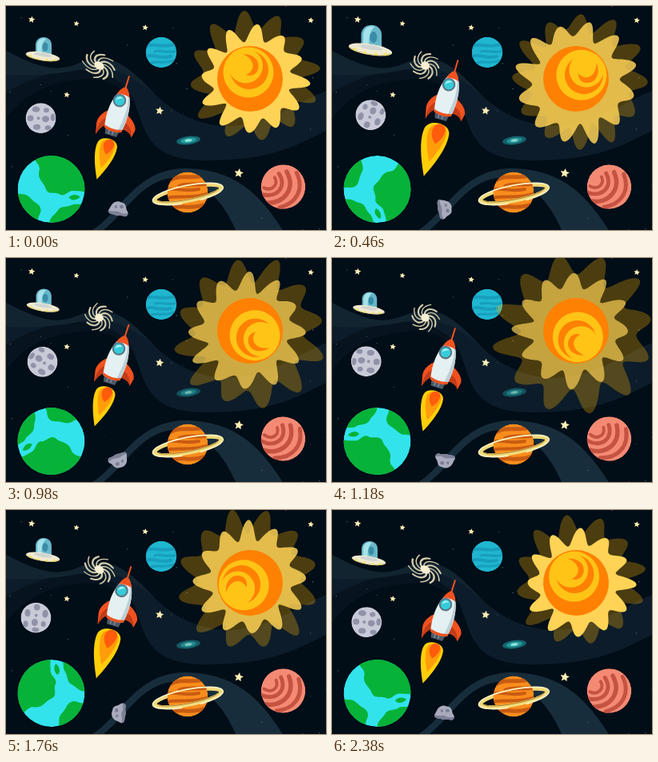
Animation, 400 px wide and 280 px high, one loop 2.4 s. Source, as an HTML page:

```html
<!DOCTYPE html>
<html lang="en">
<head>
<meta charset="utf-8">
<title>Space</title>
<style>
html, body { margin: 0; width: 100%; height: 100%; overflow: hidden; background: #010d17; }
svg { display: block; width: 100vw; height: 100vh; }
</style>
</head>
<body>
<svg viewBox="0 0 400 280">
  <defs>
    <clipPath id="earthClip"><circle r="42"/></clipPath>
    <clipPath id="blueClip"><circle r="19.3"/></clipPath>
    <clipPath id="redClip"><circle r="27.8"/></clipPath>
    <clipPath id="saturnClip"><circle r="25.5"/></clipPath>
    <clipPath id="moonClip"><circle r="19"/></clipPath>
    <path id="star" fill="#ffeeb4"/>
  </defs>
  <rect width="400" height="280" fill="#010d17"/>
  <path fill="#0c1c2a" d="M0 56C35 74 60 85 90 72C130 55 152 74 186 110C216 140 250 150 280 150C330 148 365 120 400 106V156C360 176 330 193 250 193C190 193 177 170 166 135C155 100 130 82 92 87C50 92 25 108 0 140Z"/>
  <path fill="#07141f" d="M0 108C30 92 60 78 95 80C135 83 155 100 164 126C150 102 125 88 92 92C50 96 22 112 0 140Z"/>
  <path fill="#122430" d="M0 56C35 74 60 85 90 72C130 55 152 74 186 110C160 88 130 72 95 79C60 86 30 88 0 86Z"/>
  <path fill="#182d3b" d="M108 280C140 262 160 205 222 203C290 203 320 240 346 280H287C270 240 242 214 207 215C168 220 152 256 122 280Z"/>
  <g id="dots" fill="#5b6d70"></g>
  <g id="stars"></g>

  <!-- blue planet -->
  <g transform="translate(194 58)" clip-path="url(#blueClip)">
    <circle r="19.3" fill="#20b6d0"/>
    <g fill="none" stroke="#179fbd" stroke-linecap="round">
      <path stroke-width="4" d="M-19-8C-8-12 0-5 18-10"/>
      <path stroke-width="3" d="M-8-1C0-4 8 2 20-2"/>
      <path stroke-width="4" d="M-20 5C-9 1 -2 9 12 5"/>
      <path stroke-width="3" d="M-12 13C-4 10 6 15 15 10"/>
    </g>
  </g>

  <!-- spindle galaxy -->
  <g id="spindle" transform="translate(228 168) rotate(-8)">
    <ellipse rx="15" ry="5.2" fill="#15656f"/>
    <ellipse rx="10" ry="3.2" fill="#279da0"/>
    <ellipse rx="4.5" ry="1.7" fill="#8fe6d8"/>
  </g>

  <!-- ringed planet -->
  <g transform="translate(227 233)">
    <g transform="rotate(-11)" fill="none"><ellipse cy="2" rx="42" ry="8.5" stroke="#f0d878" stroke-width="4.5"/></g>
    <g clip-path="url(#saturnClip)">
      <circle r="25.5" fill="#f98d1c"/>
      <g fill="none" stroke="#c95c12" stroke-linecap="round">
        <path stroke-width="5" d="M-22-15C-8-24 4-15 24-22"/>
        <path stroke-width="5" d="M-10-8C4-13 12-7 28-12"/>
        <path stroke-width="4" d="M-27-3C-16-7-8 0 14-4"/>
        <path stroke-width="4" d="M-26 7C-12 3 4 9 27 1"/>
        <path stroke-width="5" d="M-18 19C-8 15 4 22 22 15"/>
      </g>
    </g>
    <g transform="rotate(-11) translate(0 2)" fill="none">
      <path stroke="#f3dc7c" stroke-width="4.5" d="M-42 0A42 8.5 0 0 0 42 0"/>
      <ellipse rx="44.8" ry="10.8" stroke="#fff4c4" stroke-width="1.6" stroke-dasharray="34 23 200"/>
      <path stroke="#a87a2a" stroke-width=".9" d="M-39 0A39 7 0 0 0 39 0"/>
    </g>
  </g>

  <!-- red planet -->
  <g id="red">
    <g clip-path="url(#redClip)">
      <circle r="27.8" fill="#f58a74"/>
      <g fill="none" stroke="#c55341" stroke-linecap="round">
        <path stroke-width="4" d="M-24-2C-14 4-5-4-9-13"/>
        <path stroke-width="5" d="M-27 6C-9 13 5 0-3-17"/>
        <path stroke-width="5.5" d="M-22 17C-4 21 16 6 7-18"/>
        <path stroke-width="5" d="M-8 25C14 23 26 6 19-15"/>
      </g>
    </g>
  </g>

  <!-- earth -->
  <g id="earth">
    <g clip-path="url(#earthClip)">
      <circle r="42" fill="#32e3ec"/>
      <g fill="#07b238">
        <path d="M-24-46C-22-33-13-32-15-23C-18-12-9-9-7-1C-4 8 4 3 10 6C17 11 21 1 28 2C34 3 38 1 46 6L50-50H-24Z"/>
        <path d="M-46 4C-37 8-32 4-26 11C-20 18-14 18-13 25C-12 31-18 34-16 42H-46Z"/>
        <path d="M-2 46C-3 35 4 33 8 27C12 20 20 23 25 20C30 17 34 20 40 18V46Z"/>
        <path d="M22 10C27 5 35 7 36 10C31 14 25 15 22 10Z"/>
      </g>
    </g>
  </g>

  <!-- moon -->
  <g id="moon">
    <g transform="translate(.5 5.5)" clip-path="url(#moonClip)">
      <circle r="19" fill="#c8cad8"/>
      <g fill="#9093a8">
        <ellipse cx="-6" cy="-11" rx="5" ry="3.6"/><ellipse cx="7" cy="-10" rx="3.5" ry="3"/>
        <ellipse cx="-13" cy="0" rx="4" ry="3.8"/><ellipse cx="6" cy="1" rx="4.5" ry="4"/>
        <ellipse cx="15" cy="-1" rx="2.8" ry="4.5"/><ellipse cx="-5" cy="11" rx="4.6" ry="3.5"/>
        <ellipse cx="9" cy="12" rx="4" ry="3"/><circle cx="-3" cy="0" r="2"/>
      </g>
    </g>
  </g>

  <!-- asteroid -->
  <g id="rock">
    <path fill="#a9abbd" d="M-12.5 4C-10-1-10-6-5-8C-1-10 1-8 4-8C9-7 8-2 11 1C14 4 12 8 8 8C4 7 0 10-4 8C-8 8-13 8-12.5 4Z"/>
    <g fill="#7d8095">
      <path d="M-12.5 4C-7 6-3 2 2 4C6 6 9 4 12 4C13 7 10 9 8 8C4 7 0 10-4 8C-8 8-13 8-12.5 4Z"/>
      <ellipse cx="3" cy="-3" rx="2.6" ry="2.2"/><circle cx="-4" cy="-2" r="1.8"/>
    </g>
  </g>

  <!-- spiral galaxy -->
  <g transform="translate(116.5 74.5) rotate(32)">
    <g id="squash">
      <g id="spiral" fill="none" stroke="#d3ccac" stroke-linecap="round"></g>
      <circle r="6.5" fill="#f6efd2"/>
    </g>
  </g>

  <!-- saucer -->
  <g id="ufo">
    <path fill="#67b7cb" d="M-9 4V-10C-8-22 11-22 11-9V5Z"/>
    <path fill="#a6e2e9" d="M-7 2V-10C-6-17 0-19 4-17C-1-13-2-6-1 3Z"/>
    <ellipse cx="3" cy="-7" rx="3.5" ry="5.5" fill="#398ca7"/>
    <g transform="translate(0 5) rotate(9)">
      <ellipse rx="21.5" ry="5.3" fill="#f0ead2"/>
      <path fill="#cfc272" d="M-21.5 0C-12 6 12 6 21.5 0C20 7-20 7-21.5 0Z"/>
      <ellipse cy="-2" rx="11.5" ry="2.3" fill="#cfd5d2"/>
      <g fill="#f9e15c"><circle cx="-15" cy="2" r="1.4"/><circle cx="-5" cy="3.6" r="1.4"/><circle cx="6" cy="3.6" r="1.4"/><circle cx="15" cy="2" r="1.4"/></g>
    </g>
  </g>

  <!-- rocket -->
  <g id="rocket">
    <g id="flame">
      <path fill="#ffcf0a" d="M0 54C-6 42-15 22-12.5 9C-10-1 10-2 12.5 8C15 22 6 42 0 54Z"/>
      <path fill="#ff9d0a" d="M1 39C-4 30-9 18-8 9C-6 1 8 1 10 8C11 18 6 30 1 39Z"/>
      <path fill="#ff5c0c" d="M2 21C-3 17-6 11-4 6C-2 0 6 0 8 5C9 11 6 17 2 21Z"/>
    </g>
    <path fill="#4b5968" d="M-10 37H9L7 47H-8Z"/>
    <path stroke="#8496a2" stroke-width="1.2" d="M-4 40V46M1 40V46"/>
    <path fill="#f0521f" d="M-11 17C-17 20-23 29-22 37L-19 51C-17 44-14 38-9 36ZM11 16C18 19 26 25 27 32L25 42C22 37 16 35 10 36Z"/>
    <path fill="#c23c18" d="M-11 27C-17 30-20 38-19 51C-17 44-14 38-9 36ZM11 27C18 27 23 33 25 42C22 37 16 35 10 36Z"/>
    <path fill="#e4f0f1" d="M0-16C11-7 16 14 11 39C5 42-5 42-11 39C-16 14-11-7 0-16Z"/>
    <path fill="#bccfd6" d="M4-12C12-3 15 16 11 39L6 41C10 22 11 2 4-12Z"/>
    <path fill="#f0521f" d="M0-17C4-14 7-10 8-5C4-7-4-7-8-5C-7-10-4-14 0-17ZM-11.5 36C-5 39 5 39 11.5 36L11 39.5C5 42.5-5 42.5-11 39.5Z"/>
    <path stroke="#f0521f" stroke-width="2" stroke-linecap="round" d="M0-30V-15"/>
    <circle cx="-2.5" cy="2" r="8.3" fill="#5d7584"/>
    <circle cx="-2.5" cy="2" r="6.2" fill="#35ccd9"/>
    <path fill="#b5f3f4" d="M-7 3C-7-2-3-4 1-2C-3-1-5 1-7 3Z"/>
  </g>

  <!-- sun -->
  <path id="glow" fill="#ffb400" fill-opacity=".29"/>
  <path id="rays" fill="#ffd356"/>
  <g id="disc">
    <circle r="41" fill="#ff8103"/>
    <circle cx="-2" cy="-8" r="31.5" fill="#ffc416"/>
    <circle cx="-1" cy="-11" r="24" fill="#ff8103"/>
    <circle cx="-5.5" cy="-16" r="21.5" fill="#ffc416"/>
    <path fill="#ff8103" d="M-9-31C8-31 15-18 8-8C5-4-1-3-5-5C7-10 7-24-9-31Z"/>
  </g>
</svg>
<script>
const LOOP = 2400, TAU = Math.PI * 2;
const el = id => document.getElementById(id);
const move = (id, v) => el(id).setAttribute('transform', v);

const polygon = (n, at) => 'M' + Array.from({ length: n }, (_, i) => {
  const [r, a] = at(i);
  return (r * Math.cos(a)).toFixed(2) + ' ' + (r * Math.sin(a)).toFixed(2);
}).join('L') + 'Z';

// Wavy closed outline with twelve slightly uneven, leaning bumps
function corona(base, amp, phase) {
  return polygon(300, i => {
    const a = i / 300 * TAU;
    const uneven = 1 + .25 * Math.sin(3 * a + 1) + .15 * Math.cos(5 * a);
    const wave = Math.cos(12 * a + phase + .25 * Math.sin(2 * a));
    return [base + amp * uneven * wave, a + .02 * wave];
  });
}
el('rays').setAttribute('d', corona(58.5, 9.5, -.63));
el('glow').setAttribute('d', corona(70, 11.5, 1.88));
el('star').setAttribute('d', polygon(10, i => [i % 2 ? 2.2 : 4.6, i * TAU / 10 - 1.4]));

const svgAdd = (id, s) => { el(id).innerHTML += s; };
[[32, 17, .95], [88, 22, .8], [174, 27, .85], [381, 18, .85], [76, 111, .85], [192, 131, 1.15], [291, 209, 1.3]]
  .forEach(([x, y, s]) => svgAdd('stars', `<use href="#star" transform="translate(${x} ${y}) scale(${s})"/>`));
let seed = 11;
const rnd = () => (seed = seed * 16807 % 2147483647) / 2147483647;
for (let i = 0; i < 34; i++)
  svgAdd('dots', `<circle cx="${(rnd() * 400).toFixed(1)}" cy="${(rnd() * 280).toFixed(1)}" r="${(.35 + rnd() * .4).toFixed(2)}"/>`);
for (let i = 0; i < 10; i++)
  svgAdd('spiral', `<path transform="rotate(${i * 36})" stroke-width="${i % 2 ? 2.6 : 1.7}" d="M2-4C9-10 18-6 ${i % 2 ? 20 : 22} 5"/>`);

// Eased value between [time, value] pairs
function keys(t, list) {
  let i = 1;
  while (i < list.length - 1 && list[i][0] < t) i++;
  const [t0, a] = list[i - 1], [t1, b] = list[i];
  const p = (t - t0) / (t1 - t0);
  return a + (b - a) * (.5 - .5 * Math.cos(Math.PI * p));
}
const track = (times, vals) => times.map((t, i) => [t, vals[i]]);
const long = [0, 460, 760, 1180, 1520, 1980, 2400];
const short = [0, 320, 460, 760, 1200];
const T = {
  rays: track(long, [1, 1.12, 1.09, 1.07, 1.02, 1.06, 1]),
  rayAlpha: track(long, [1, .84, .79, .68, .75, .92, 1]),
  glow: track(long, [1, 1.04, 1.06, 1.23, 1.12, 1.04, 1]),
  ufoX: track(long, [46, 48, 46.5, 46, 46, 46, 46]),
  ufoY: track(long, [58, 48, 53, 60, 58, 50, 58]),
  ufoS: track(long, [1, 1.28, 1, .93, 1.1, .9, 1]),
  spin: track(long, [1, .84, .83, .8, .88, 1, 1]),
  rockX: track(short, [0, 4, 4, -2, 0]),
  rockY: track(short, [0, -12, -20, -9.5, 0]),
  lean: track(short, [0, -1, -1, 2.5, 0]),
  flameW: track(short, [1, 1.12, 1.26, .97, 1]),
  flameH: track(short, [1, 1.08, 1.3, .96, 1])
};

function draw(ms) {
  const t = ms % LOOP, s = ms % (LOOP / 2), turn = 360 * t / LOOP;
  const v = (name, time = t) => keys(time, T[name]);
  const wave = Math.cos(t / LOOP * TAU);
  move('disc', `translate(305 91) rotate(${turn})`);
  move('rays', `translate(305 91) rotate(${turn}) translate(4 1) scale(${v('rays')})`);
  el('rays').setAttribute('fill-opacity', v('rayAlpha'));
  move('glow', `translate(306 91) rotate(${turn}) translate(3 -3) scale(${v('glow')})`);
  move('earth', `translate(56.5 229) rotate(${turn})`);
  move('moon', `translate(43 134.7) rotate(${-turn})`);
  move('rock', `translate(141 253.5) rotate(${turn + 10})`);
  move('red', `translate(346.5 226) rotate(${-8 * wave})`);
  move('squash', `scale(${v('spin')} ${.72 + .3 * (1 - v('spin'))})`);
  move('spiral', `rotate(${turn})`);
  el('spindle').setAttribute('opacity', .87 + .13 * wave);
  move('ufo', `translate(${v('ufoX')} ${v('ufoY')}) scale(${v('ufoS')})`);
  move('rocket', `translate(${145 + v('rockX', s)} ${117 + v('rockY', s)}) rotate(${17 + v('lean', s)})`);
  move('flame', `translate(-1 50.5) scale(${v('flameW', s)} ${v('flameH', s)})`);
}

const start = performance.now();
function tick() {
  draw(performance.now() - start);
  requestAnimationFrame(tick);
}
draw(0);
requestAnimationFrame(tick);
</script>
</body>
</html>
```
